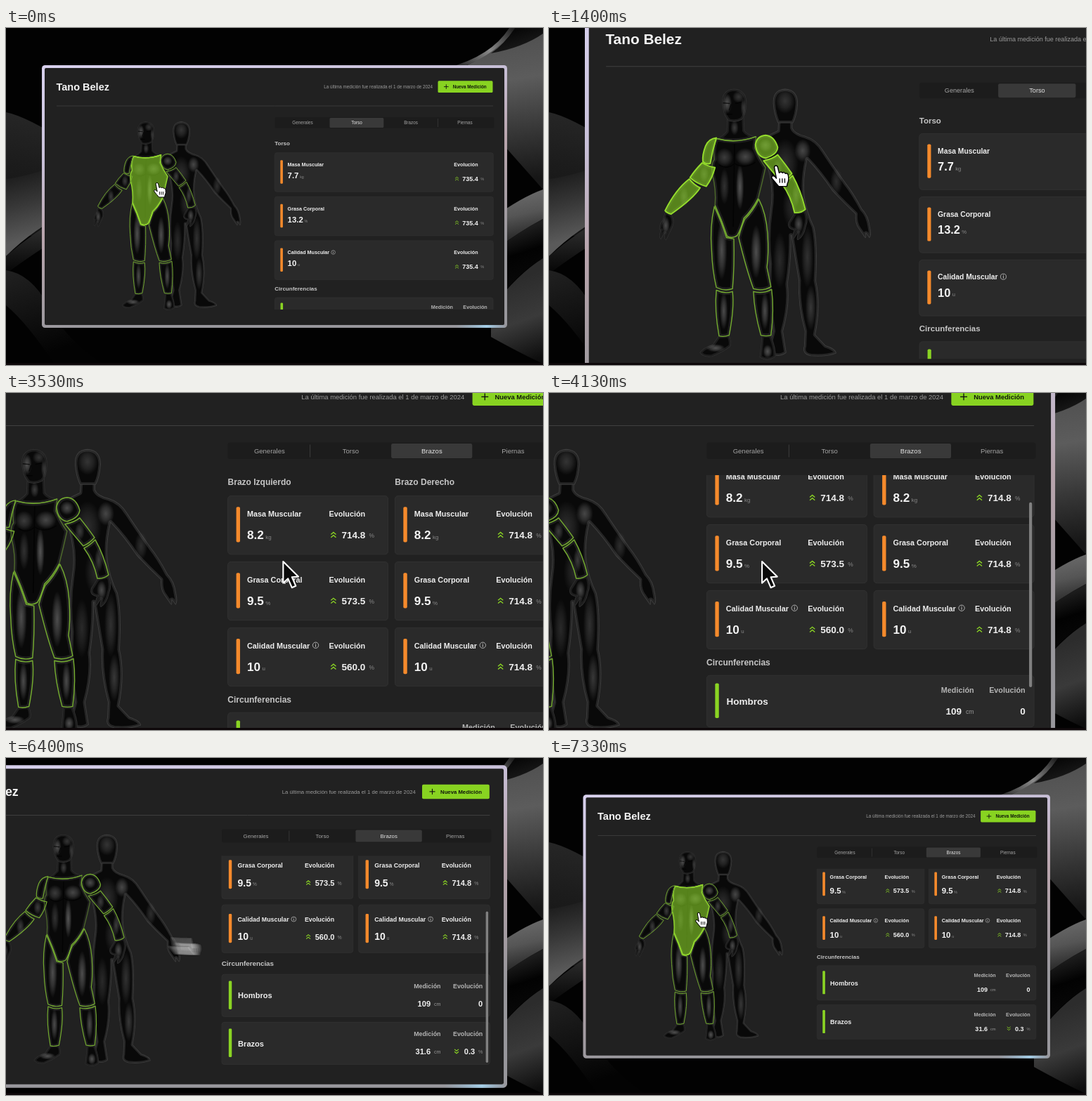
An HTML page with a canvas for the animation above (7390 ms loop, 764x480 px).

```html
<!DOCTYPE html>
<html lang="es">
<head>
<meta charset="utf-8">
<style>
html, body { margin: 0; width: 764px; height: 480px; overflow: hidden; background: #000; }
canvas { display: block; }
</style>
</head>
<body>
<canvas id="stage" width="764" height="480"></canvas>
<script>
const g = document.getElementById('stage').getContext('2d');
const LOOP = 7390, LIME = '#8ad423', ORANGE = '#f58a2c';
const FONT = '"Liberation Sans", Arial, sans-serif';

const clamp = v => Math.max(0, Math.min(1, v));
const mix = (a, b, k) => a + (b - a) * k;
const ease = v => (v = clamp(v), v < .5 ? 4 * v ** 3 : 1 - (2 - 2 * v) ** 3 / 2);
const spring = t => t < 0 ? 0 : 1 - (1 + t * .0055) * Math.exp(-t * .0055);
const paths = list => list.map(d => new Path2D(d));

// ---- helpers ----
function box(x, y, w, h, r, fill, line) {
  g.beginPath();
  g.roundRect(x, y, w, h, r);
  g.fillStyle = fill;
  g.fill();
  if (line) { g.strokeStyle = line; g.lineWidth = .6; g.stroke(); }
}

// y is the middle of the capitals
function text(s, x, y, size, color, bold = true, align = 'left') {
  g.font = `${bold ? 'bold ' : ''}${size}px ${FONT}`;
  g.textAlign = align;
  g.fillStyle = color;
  g.fillText(s, x, y + size * .36);
}

function line(color, width, ...pts) {
  g.beginPath();
  for (let i = 0; i < pts.length; i += 2) g.lineTo(pts[i], pts[i + 1]);
  g.strokeStyle = color;
  g.lineWidth = width;
  g.stroke();
}

function shade(d, x0, y0, x1, y1, ...colors) {
  const grad = g.createLinearGradient(x0, y0, x1, y1);
  colors.forEach((c, i) => grad.addColorStop(i / (colors.length - 1), c));
  g.fillStyle = grad;
  g.fill(new Path2D(d));
}

// ---- backdrop ----
function backdrop() {
  g.fillStyle = '#020202';
  g.fillRect(0, 0, 764, 480);
  shade('M0,120 Q30,126 90,165 L90,290 L0,300 Z', 20, 122, 0, 260, '#262626', '#1c1c1c', '#141414');
  shade('M0,215 Q30,212 90,190 L90,262 Q40,285 0,325 Z', 10, 205, 35, 300, '#1a1a1a', '#383838', '#5a5a5a');
  shade('M0,325 Q40,290 90,262 L90,290 Q40,320 0,350 Z', 0, 290, 0, 350, '#2a2a2a', '#050505');
  shade('M0,345 Q35,350 60,395 Q85,445 140,480 L70,480 Q30,420 0,395 Z', 0, 350, 40, 470, '#202020', '#121212', '#030303');
  shade('M764,0 L724,0 Q695,38 640,60 L640,90 L764,230 Z', 720, 0, 750, 215, '#4e4e4e', '#5c5c5c', '#383838', '#161616');
  shade('M716,0 L724,0 Q700,36 648,56 L630,56 Q690,40 716,0 Z', 720, 0, 650, 54, '#202020', '#8a8a8a', '#333');
  shade('M764,0 L724,0 Q708,24 690,36 Q735,28 764,8 Z', 735, 0, 745, 30, '#080808', '#1c1c1c');
  shade('M764,230 Q735,240 690,272 L690,320 Q730,290 764,272 Z', 735, 232, 748, 295, '#6a6a6a', '#555', '#2b2b2b');
  shade('M764,272 Q730,290 690,320 L690,400 Q730,345 764,328 Z', 725, 290, 745, 350, '#1d1d1d', '#020202', '#070707');
  shade('M764,328 Q728,350 690,400 L690,440 Q735,465 764,478 Z', 720, 360, 760, 470, '#2c2c2c', '#3a3a3a', '#0d0d0d');
}

// ---- body, drawn in enlarged coordinates ----
const ZOOM = 1.497;
const torso = new Path2D('M247,154 Q275,162 305,151 L303,168 Q310,184 319,197 Q314,220 308,243 Q298,262 287,272 Q282,290 277,298 Q270,303 262,299 Q254,275 244,253 Q246,230 240,207 Q238,190 243,185 Q240,165 247,154 Z');
const seams = new Path2D('M247,154 Q275,162 305,151 M308,243 Q298,262 287,272 Q282,290 277,298 Q270,303 262,299 Q254,275 244,253');
const arms = paths([
  'M246,153 Q235,154 230,165 Q225,178 226,188 Q231,193 237,191 Q240,172 246,153 Z',
  'M225,190 Q235,196 244,197 Q240,213 231,225 Q217,221 207,212 Q214,201 225,190 Z',
  'M206,214 Q213,223 222,227 Q212,243 179,266 Q173,265 170,261 Q186,229 206,214 Z',
  'M304,163 Q306,150 319,149 Q332,150 337,167 Q336,178 319,183 Q306,181 304,163 Z',
  'M316,187 Q330,184 337,178 Q349,193 358,206 Q351,214 342,218 Q329,203 316,187 Z',
  'M343,221 Q351,217 359,209 Q371,230 378,259 Q371,265 362,264 Q357,240 343,221 Z'
]);
const legs = paths([
  'M243,255 Q236,285 239,320 Q240,350 246,375 Q258,381 270,377 Q273,345 272,303 L261,301 Q253,276 243,255 Z',
  'M309,244 Q320,265 322,295 Q324,325 321,345 L327,374 Q315,381 301,377 Q291,350 279,301 Q283,285 288,274 Q300,262 309,244 Z',
  'M246,379 Q258,385 270,381 Q273,405 265,446 Q257,449 250,447 Q243,408 246,379 Z',
  'M301,381 Q315,385 328,378 Q332,408 327,446 Q320,448 312,446 Q302,410 301,381 Z'
]);
const bare = paths([
  'M262,118 L261,143 Q255,150 247,154 Q275,162 305,151 Q292,148 288,142 L287,118 Z',
  'M254,103 Q253,81 272,80 Q292,81 291,103 Q291,118 284,126 Q275,131 264,128 Q257,120 256,112 Z',
  'M170,262 L180,267 Q185,275 182,284 L172,305 Q168,306 169,295 L164,304 Q159,302 163,290 L161,289 Q161,280 166,275 Z',
  'M362,264 L378,260 Q384,272 379,285 Q376,300 367,305 Q364,305 367,294 L361,303 Q357,301 361,290 Q350,288 353,278 Z',
  'M249,447 L265,446 Q270,456 267,463 Q255,472 240,478 Q226,480 221,472 Q226,464 240,460 Z',
  'M313,446 L327,446 Q335,465 334,478 Q322,487 310,479 Q312,462 313,446 Z'
]);
const rear = paths([
  'M338,125 L337,142 Q320,150 312,155 L325,210 Q330,235 326,260 Q320,300 325,340 Q322,390 330,440 L322,470 Q338,482 350,472 L345,440 Q356,400 352,370 Q358,330 357,298 Q362,330 368,365 Q366,400 377,440 L376,462 Q372,474 386,477 Q408,479 424,473 Q424,466 408,461 L393,445 Q402,400 394,365 Q397,310 391,285 Q380,262 377,240 Q374,215 381,185 Q400,205 418,232 Q435,250 452,266 Q451,280 457,288 L466,301 Q469,304 468,295 L473,302 Q477,298 474,285 Q472,268 462,258 Q450,235 438,220 Q420,195 405,172 Q395,155 378,150 Q362,146 359,138 L359,125 Z',
  'M330,102 Q329,81 348,80 Q367,81 367,102 Q366,120 360,131 L337,131 Q331,118 330,102 Z'
]);
// x, y, rx, ry, strength
const rearGlow = [[348, 98, 15, 19, .24], [374, 172, 12, 17, .34], [348, 190, 20, 36, .2], [360, 255, 16, 34, .18],
  [340, 335, 10, 42, .18], [381, 330, 9, 46, .22], [386, 405, 8, 34, .26], [424, 218, 9, 20, .2]];
const frontGlow = [[262, 102, 7, 15, .4], [279, 92, 9, 9, .24], [286, 108, 4, 14, .26], [273, 138, 6, 11, .28],
  [258, 182, 13, 14, .28], [289, 181, 15, 13, .34], [281, 226, 6, 34, .42], [258, 225, 7, 27, .22], [254, 320, 8, 44, .38],
  [305, 322, 8, 40, .38], [257, 410, 6, 28, .36], [318, 410, 6, 28, .36], [245, 465, 14, 6, .4], [322, 470, 7, 10, .4],
  [171, 283, 6, 14, .36], [368, 281, 7, 14, .36], [228, 207, 7, 13, .28], [198, 240, 7, 15, .28], [319, 164, 10, 10, .36],
  [337, 197, 7, 13, .28], [364, 238, 6, 18, .28]];
const creases = new Path2D('M250,193 Q262,201 273,191 Q288,200 304,189 M273,162 L271,285 M256,101 L266,102 M274,102 L283,100 M268,103 L265,112 M261,118 L270,118');

function solid(p, rim) {
  g.fillStyle = '#090909';
  g.fill(p);
  g.save();
  g.clip(p);
  for (const w of [7, 2]) {
    g.lineWidth = w;
    g.strokeStyle = `rgba(175,175,175,${rim})`;
    g.stroke(p);
  }
  g.restore();
}

function glow([x, y, rx, ry, a]) {
  g.save();
  g.translate(x, y);
  g.scale(rx, ry);
  const grad = g.createRadialGradient(0, 0, 0, 0, 0, 1);
  grad.addColorStop(0, `rgba(190,190,190,${a})`);
  grad.addColorStop(.55, `rgba(190,190,190,${a * .55})`);
  grad.addColorStop(1, 'rgba(190,190,190,0)');
  g.fillStyle = grad;
  g.fillRect(-1, -1, 2, 2);
  g.restore();
}

function body(torsoFill, armFill) {
  g.save();
  g.translate(51, 240);
  g.scale(1 / ZOOM, 1 / ZOOM);
  g.translate(-51, -240);
  g.lineJoin = 'round';
  rear.forEach(p => solid(p, .17));
  rearGlow.forEach(glow);
  [...bare, torso, ...legs, ...arms].forEach(p => solid(p, .12));
  frontGlow.forEach(glow);
  g.strokeStyle = 'rgba(0,0,0,.7)';
  g.lineWidth = 1.6;
  g.stroke(creases);
  const outline = (p, k, color) => {
    g.strokeStyle = color || (k > .3 ? '#94dc2c' : '#74ad2e');
    g.lineWidth = 1.4 + .6 * k;
    g.stroke(p);
  };
  const zone = (p, k, color) => {
    g.fillStyle = `rgba(138,212,40,${.6 * k})`;
    g.fill(p);
    outline(p, k, color);
  };
  legs.forEach(p => zone(p, 0));
  zone(torso, torsoFill, torsoFill > .3 ? '#94dc2c' : 'rgba(116,173,46,.5)');
  outline(seams, torsoFill);
  arms.forEach(p => zone(p, armFill));
  g.restore();
}

// ---- panel ----
function chevrons(x, y, dir) {
  for (const d of [-1.4, 1.4])
    line(LIME, .9, x, y + d + dir, x + 2.4, y + d - dir, x + 4.8, y + d + dir);
}

function statCard(x, y, w, drop, name, value, unit, growth) {
  const right = x + w - 56;
  box(x, y, w, 55.5, 3, '#2a2a2a', '#333');
  box(x + 8, y + 10.5, 3.6, 33.5, 1.2, ORANGE);
  text(name, x + 18.3, y + 17, 7.2, '#eee');
  if (name[0] === 'C') {
    g.beginPath();
    g.arc(x + 83.3, y + 16.6, 2.8, 0, 7);
    g.strokeStyle = '#bbb';
    g.lineWidth = .6;
    g.stroke();
    line('#bbb', .7, x + 83.3, y + 16, x + 83.3, y + 18.2);
    line('#bbb', .7, x + 83.3, y + 14.8, x + 83.3, y + 15.4);
  }
  text(value, x + 18.3, y + drop, 11.4, '#f4f4f4');
  const end = x + 20 + g.measureText(value).width;
  text(unit, end, y + drop + 2, 5.3, '#888', false);
  text('Evolución', right, y + 17, 7.2, '#eee');
  chevrons(right + 1.8, y + 37, 1);
  text(growth, right + 12, y + 37, 9, '#f0f0f0');
  text('%', right + 38, y + 37.5, 5.6, '#888', false);
}

function girthCard(y, name, value, change) {
  box(382.5, y, 310.5, 49, 3, '#2a2a2a', '#333');
  box(390.5, y + 7.5, 3.6, 33, 1.2, LIME);
  text(name, 401.3, y + 24.7, 9, '#eee');
  text('Medición', 636, y + 13.8, 7.2, '#b4b4b4', true, 'right');
  text('Evolución', 684.7, y + 13.8, 7.2, '#b4b4b4', true, 'right');
  text(value, 624.3, y + 33.7, 9, '#f0f0f0', true, 'right');
  text('cm', 636, y + 34.3, 5.8, '#999', false, 'right');
  if (change === '0') return text('0', 684.7, y + 33.7, 9, '#f0f0f0', true, 'right');
  chevrons(652, y + 33.7, -1);
  text(change, 675.7, y + 33.7, 9, '#f0f0f0', true, 'right');
  text('%', 684.7, y + 34, 5.8, '#888', false, 'right');
}

const NAMES = ['Masa Muscular', 'Grasa Corporal', 'Calidad Muscular'], UNITS = ['kg', '%', 'u'];
function column(x, w, drop, title, values, growth) {
  text(title, x, 164.5, 8, '#c6c6c6');
  NAMES.forEach((n, i) => statCard(x, 177.7 + 62.6 * i, w, drop, n, values[i], UNITS[i], growth[i]));
}

function list(limbs, scroll, barAlpha) {
  g.save();
  g.beginPath();
  g.rect(375, 158, 325, 243);
  g.clip();
  g.translate(0, -scroll);
  if (limbs) {
    const values = ['8.2', '9.5', '10'];
    column(382.5, 152, 36.8, 'Brazo Izquierdo', values, ['714.8', '573.5', '560.0']);
    column(541, 152, 36.8, 'Brazo Derecho', values, ['714.8', '714.8', '714.8']);
    girthCard(383.5, 'Hombros', '109', '0');
    girthCard(439, 'Brazos', '31.6', '0.3');
  } else {
    column(382.3, 311, 32.4, 'Torso', ['7.7', '13.2', '10'], ['735.4', '735.4', '735.4']);
    girthCard(384, 'Cintura', '84', '0');
  }
  text('Circunferencias', 382.3, 371, 8, '#c6c6c6');
  g.restore();
  g.globalAlpha = barAlpha;
  box(688.3, 158 + scroll * .733, 2.8, 175.5, 1.4, '#808080');
  g.globalAlpha = 1;
}

function tabs(active) {
  box(382.5, 127, 312, 15.7, 2, '#1c1c1c');
  ['Generales', 'Torso', 'Brazos', 'Piernas'].forEach((name, i) => {
    const x = 383.5 + 77 * i;
    if (i === active) box(x, 128, 76.8, 14, 1.5, '#393939');
    else if (i && i !== active + 1) line('#3c3c3c', .7, x, 129, x, 141);
    text(name, x + 38.5, 135, 6.35, i === active ? '#e4e4e4' : '#a4a4a4', false, 'center');
  });
}

function frame() {
  const edge = g.createLinearGradient(51, 53, 130, 427);
  [[0, '#d8d1ee'], [.35, '#c8c0d8'], [.62, '#b9a5ad'], [1, '#98979c']].forEach(s => edge.addColorStop(...s));
  box(51, 53, 662, 374, 4.5, edge);
  const tint = g.createLinearGradient(640, 0, 713, 0);
  [[0, '#8fb8d600'], [.6, '#a5cfe8'], [1, '#8fb8d600']].forEach(s => tint.addColorStop(...s));
  box(640, 423, 70, 4, 0, tint);
  box(55, 57, 654, 366, 2, '#212121');
}

function header() {
  text('Tano Belez', 71.5, 83.7, 14.5, '#f4f4f4');
  text('La última medición fue realizada el 1 de marzo de 2024', 607, 83.7, 6.3, '#9a9a9a', false, 'right');
  box(614.5, 75.3, 78, 16.7, 1.6, '#88d321');
  line('#111', .9, 623, 83.6, 629.6, 83.6);
  line('#111', .9, 626.3, 80.3, 626.3, 86.9);
  text('Nueva Medición', 635.7, 83.6, 6.3, '#10180a');
  line('#404040', .8, 72, 111, 693, 111);
}

// ---- pointer ----
const arrow = new Path2D('M0,0 L0,20.5 L4.6,16.2 L8.3,24.8 L12,23.2 L8.3,14.8 L14.4,14.4 Z');
const hand = new Path2D('M3.2,2.2 Q3.2,.4 4.8,.4 Q6.2,.4 6.6,2 L8,7.6 Q10,5.6 11.2,7.6 Q13.2,6.2 14,8.2 Q16.5,7.4 17,10.2 Q18,15 16.2,18 L15.6,21 L7.6,21 Q5,18 .9,13 Q0,11 2,10.5 Q3.5,10.5 5.2,13 Z');

function pointerAt(t) {
  const a = ease((t - 350) / 600), b = ease((t - 2296) / 900), c = ease((t - 5950) / 900);
  return [mix(mix(mix(214.5, 240, a), 435, b), 214.5, c),
    mix(mix(mix(221, 210, a), 240, b), 221, c) + 22 * Math.sin(Math.PI * c)];
}

function pointer(t, isHand) {
  const [x, y] = pointerAt(t);
  g.save();
  g.translate(x, y);
  g.lineJoin = 'round';
  if (isHand) {
    g.translate(-4.5, -1);
    g.fillStyle = '#fff';
    g.fill(hand);
    g.strokeStyle = '#000';
    g.lineWidth = 1;
    g.stroke(hand);
    for (const k of [8.5, 11, 13.5]) line('#000', .9, k, 13, k + .1, 17.5);
  } else {
    g.fillStyle = '#0a0a0a';
    g.fill(arrow);
    g.strokeStyle = '#fff';
    g.lineWidth = 1.4;
    g.stroke(arrow);
  }
  g.restore();
}

function draw(now) {
  const t = now % LOOP;
  const scale = 1 + .5 * (spring(t - 750) - spring(t - 6070));
  const left = mix(51, 713 - 662 * scale, spring(t - 3085));
  const limbs = t > 1800;
  const torsoFill = clamp((700 - t) / 150) + clamp((t - 6600) / 150);
  const armFill = clamp((t - 600) / 150) * clamp((2570 - t) / 200);

  backdrop();
  g.save();
  g.translate(left, 240);
  g.scale(scale, scale);
  g.translate(-51, -240);
  frame();
  header();
  body(torsoFill, armFill);
  tabs(limbs ? 2 : 1);
  list(limbs, 88 * spring(t - 3880), clamp((t - 3850) / 100) * clamp((6900 - t) / 250));
  const back = t > 6000 && t < 6750;
  if (back) {
    // smear of the quick way back
    g.globalAlpha = .12;
    for (let k = 0; k < 14; k++) pointer(t - k * 2.5, t > 6350);
    g.globalAlpha = 1;
  } else pointer(t, t < 2330 || t >= 6750);
  g.restore();
  g.fillStyle = '#0e080a';
  g.fillRect(0, 477, 764, 3);
}

const start = performance.now();
function tick() {
  draw(performance.now() - start);
  requestAnimationFrame(tick);
}
tick();
</script>
</body>
</html>
```
